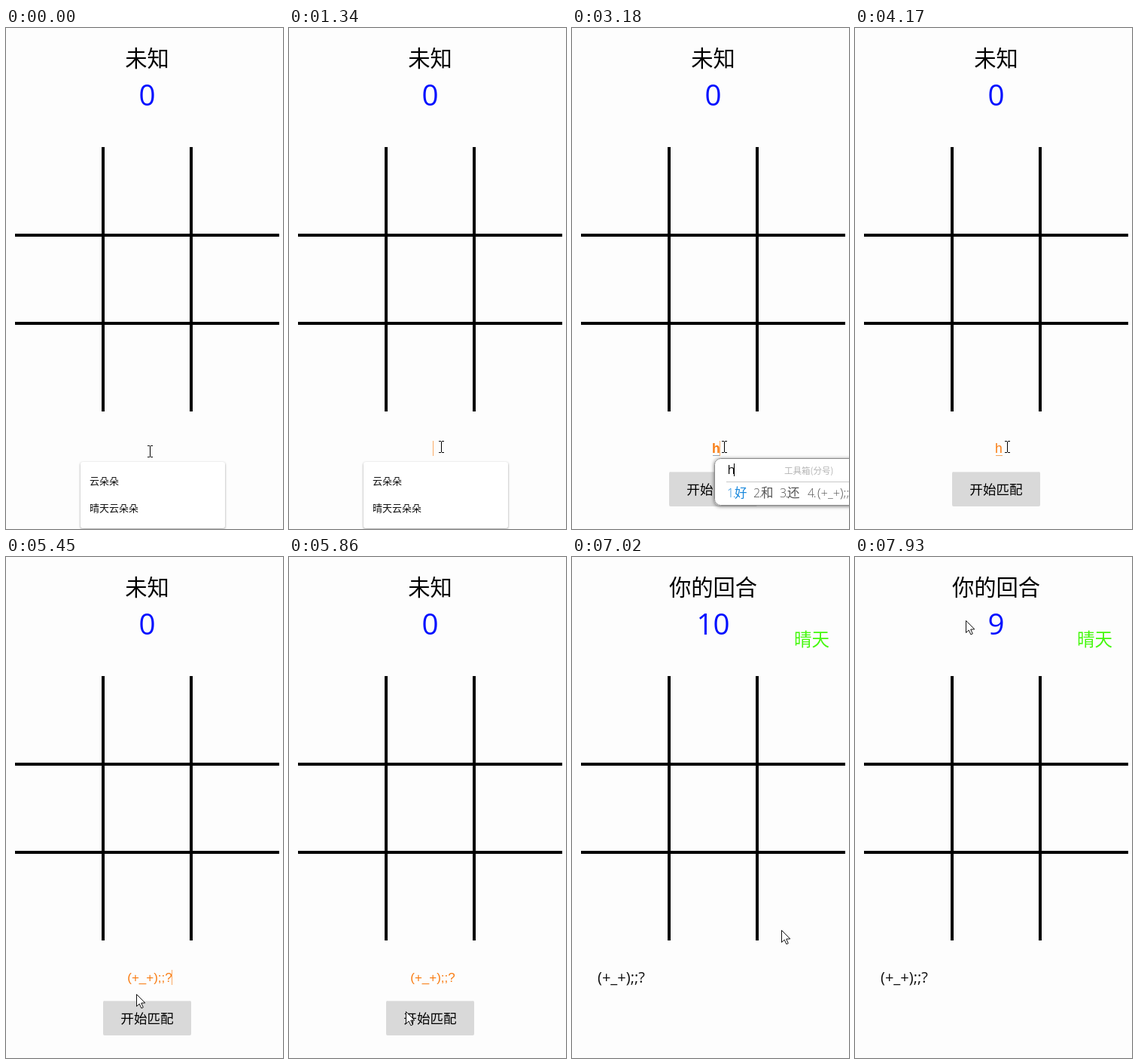
Recreate the animation shown at these times as an HTML page with a canvas. Size 368x665 px, loop 7.99 s.

```html
<!DOCTYPE html>
<html lang="zh">
<head>
<meta charset="utf-8">
<style>
  html, body { margin: 0; width: 100%; height: 100%; overflow: hidden; background: #fdfdfd; }
  canvas { display: block; }
</style>
</head>
<body>
<canvas id="stage" width="368" height="665"></canvas>
<script>
const ctx = document.getElementById("stage").getContext("2d");
const LOOP = 7990;
const CJK = '"Noto Sans CJK SC", "Noto Sans CJK", sans-serif';
const ARIAL = '"Liberation Sans", sans-serif';
const OPEN = '"Open Sans", "Noto Sans", sans-serif';
const ORANGE = "#f97d14";
const PLAYER = "(+_+);;?";
const RIVAL = "晴天";

// Pointer keys: time, x, y
const BEAM = [[440, 191, 562], [500, 194, 561], [560, 197, 559], [680, 202, 556]];
const ARROW = [
  [5280, 194, 562], [5400, 173, 580], [5640, 136, 598], [6000, 173, 608],
  [6780, 173, 608], [6900, 240, 545], [7020, 278, 495], [7140, 278, 495],
  [7380, 355, 330], [7620, 320, 120], [7800, 210, 23], [7860, 160, 45], [7920, 147, 84]
];

function along(keys, t) {
  if (t <= keys[0][0]) return keys[0].slice(1);
  for (let i = 1; i < keys.length; i++) {
    const [t0, x0, y0] = keys[i - 1], [t1, x1, y1] = keys[i];
    if (t < t1) {
      const k = (t - t0) / (t1 - t0);
      return [x0 + (x1 - x0) * k, y0 + (y1 - y0) * k].map(Math.round);
    }
  }
  return keys[keys.length - 1].slice(1);
}

const between = (t, a, b) => t >= a && t < b;

function rect(x, y, w, h, color) {
  ctx.fillStyle = color;
  ctx.fillRect(x, y, w, h);
}

function text(s, x, y, size, color, { font = CJK, weight = 400, align = "left", spacing = 0 } = {}) {
  ctx.font = `${weight} ${size}px ${font}`;
  ctx.letterSpacing = spacing + "px";
  ctx.textAlign = align;
  ctx.fillStyle = color;
  ctx.fillText(s, x, y);
}

function panel(x, y, w, h, r, fill, shadow, blur, dy) {
  ctx.save();
  ctx.shadowColor = shadow;
  ctx.shadowBlur = blur;
  ctx.shadowOffsetY = dy;
  ctx.beginPath();
  ctx.roundRect(x, y, w, h, r);
  ctx.fillStyle = fill;
  ctx.fill();
  ctx.restore();
}

function board() {
  for (const p of [0, 117]) {
    rect(127 + p, 158, 4, 351, "#000");
    rect(12, 273 + p, 351, 4, "#000");
  }
}

function header(title, count) {
  text(title, 187.5, 51, 29.3, "#000", { align: "center", weight: 350 });
  text(count, 187.5, 102.5, 38.5, "#0010ff", { font: OPEN, align: "center" });
}

function button(scale) {
  ctx.save();
  ctx.translate(187.5, 612);
  ctx.scale(scale, scale);
  panel(-58.5, -23, 117, 46, 2, "#d9d9d9", "transparent", 0, 0);
  rect(-57, -23, 114, 1, "#e4e4e4");
  text("开始匹配", 0, 6.5, 17.6, "#000", { align: "center" });
  ctx.restore();
}

function dropdown() {
  panel(99, 576, 192, 88, 3, "#fff", "rgba(0,0,0,.4)", 3, 1);
  text("云朵朵", 111, 606, 13, "#111");
  text("晴天云朵朵", 111, 642, 13, "#111");
}

function candidates(t) {
  panel(189, 571, 200, 63, 8, "#fff", "rgba(0,0,0,.55)", 5, 1);
  ctx.strokeStyle = "#8a8a8a";
  ctx.lineWidth = 1;
  ctx.beginPath();
  ctx.roundRect(189.5, 571.5, 200, 62, 8);
  ctx.stroke();
  text("h", 206.5, 592, 16.5, "#111", { font: OPEN });
  rect(215, 578, 1, 17, "#000");
  if (t >= 2510) text("工具箱(分号)", 282, 592, 11.5, "#b4b4b4");
  rect(205, 602, 163, 1, "#c8c8c8");
  const items = [[206, "好"], [241, "和"], [276, "还"], [313, PLAYER]];
  items.forEach(([x, word], i) => {
    const color = i ? "#555" : "#1787dc";
    text(`${i + 1}.`, x, 623, 16, color, { font: OPEN, weight: 300, spacing: -1.5 });
    if (i < 3) text(word, x + 10, 623, 16.5, color, { weight: 300 });
    else text(word, x + 13, 623, 16.5, color, { font: OPEN, weight: 300 });
  });
}

function caret(x) {
  rect(x, 548, 1, 20, "#fbab66");
}

function field(t) {
  if (t < 2140) {
    if (between(t, 310, 840) || between(t, 1340, 1900)) caret(191);
  } else if (t < 4230) {
    const composing = t < 4170;
    text("h", 186, 564, 17.6, ORANGE, { font: ARIAL, weight: composing ? 700 : 400 });
    rect(187, 567, 9, 1, composing ? "#8fa3b5" : "#f5a55c");
    if (between(t, 2140, 2690) || between(t, 3180, 3740)) caret(196);
  } else if (t < 6290) {
    text(PLAYER, 191, 564, 17, ORANGE, { font: ARIAL, align: "center" });
    if (t < 4720 || between(t, 5280, 5760)) caret(220);
  } else {
    text(PLAYER, 189.5, 565, 16.8, ORANGE, { font: ARIAL, align: "center" });
  }
}

function beam([x, y]) {
  rect(x, y - 7, 1, 14, "#000");
  for (const dy of [-8, 7]) {
    rect(x - 3, y + dy, 3, 1, "#000");
    rect(x + 1, y + dy, 3, 1, "#000");
  }
}

function arrow([x, y]) {
  const points = [[0, 0], [0, 16], [3.7, 12.6], [6.4, 18.4], [8.8, 17.3], [6.2, 11.6], [11.3, 11.4]];
  ctx.beginPath();
  points.forEach(([px, py]) => ctx.lineTo(x + px + 0.5, y + py + 0.5));
  ctx.closePath();
  ctx.fillStyle = "#fff";
  ctx.fill();
  ctx.strokeStyle = "#111";
  ctx.lineWidth = 1;
  ctx.stroke();
}

function draw(t) {
  rect(0, 0, 368, 665, "#fdfdfd");
  board();
  if (t < 6410) {
    header("未知", "0");
    field(t);
    if (t < 2140) {
      dropdown();
    } else {
      button(t < 6290 ? 1 : t < 6350 ? 1.05 : 1.1);
      if (t < 4170) candidates(t);
    }
  } else {
    header("你的回合", t < 7410 ? "10" : "9");
    text(RIVAL, 342, 118, 23.5, "#44f80c", { align: "right", weight: 500 });
    text(PLAYER, 34, 565, 20, "#111", { font: OPEN });
  }
  // Pointer positions update about every 60 ms
  if (t < 5090) beam(along(BEAM, 500 + Math.floor((t - 500) / 60) * 60));
  else if (t >= 5280) arrow(along(ARROW, 5280 + Math.floor((t - 5280) / 60) * 60));
}

const start = performance.now();
function tick() {
  draw((performance.now() - start) % LOOP);
  requestAnimationFrame(tick);
}
tick();
</script>
</body>
</html>
```
